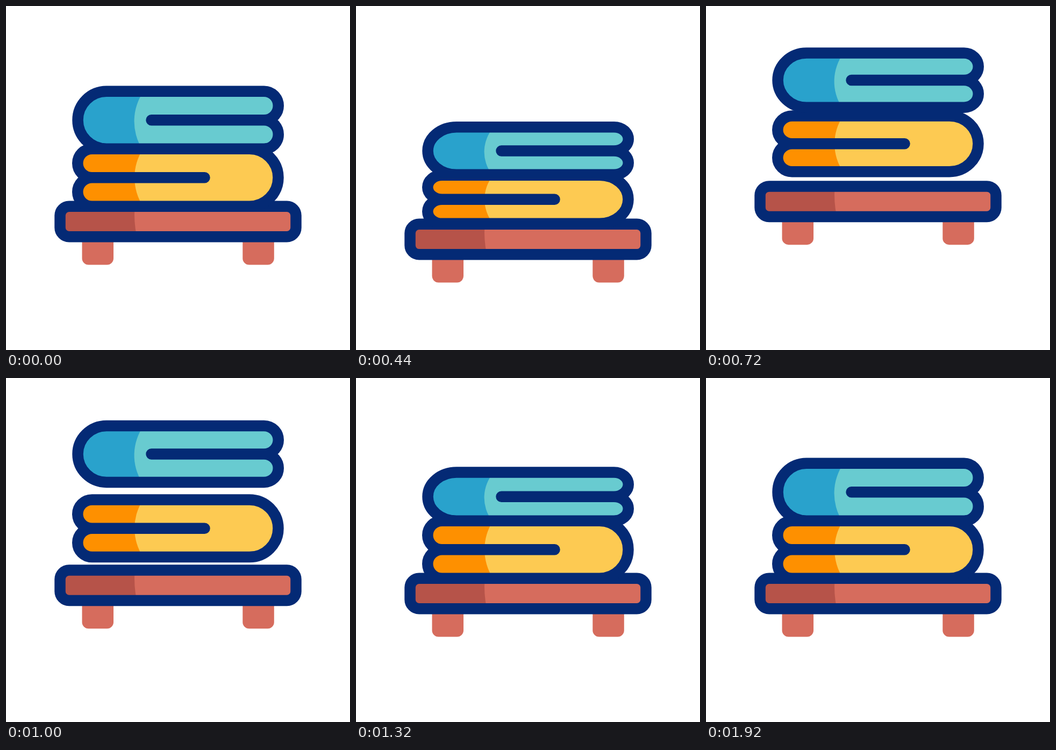
Write an HTML page that moves like this. It is 640 px wide and 640 px high and loops after 2200 ms.

```html
<!DOCTYPE html>
<html lang="en">
<head>
<meta charset="utf-8">
<title>Towels on a shelf</title>
<style>
  html, body { margin: 0; width: 100%; height: 100%; overflow: hidden; background: #fff; }
  svg { display: block; width: 100%; height: 100%; }

  .outline {
    stroke: #042a75; stroke-width: 20.5;
    stroke-linecap: round; stroke-linejoin: round;
    vector-effect: non-scaling-stroke;
  }

  .shelf, .lower, .upper {
    animation: 2200ms cubic-bezier(.333, 0, .667, 1) infinite;
  }
  .shelf { animation-name: shelf-move; }
  .lower { animation-name: lower-move, lower-squash; }
  .upper { animation-name: upper-move, upper-squash; }

  @keyframes shelf-move {
    0% { translate: 0 0; animation-timing-function: cubic-bezier(.33, 0, .58, 1); }
    17.27% { translate: 0 39px; }
    33.64% { translate: 0 -38px; }
    54.55%, 100% { translate: 0 0; }
  }

  @keyframes lower-move {
    0% { translate: 0 0; animation-timing-function: cubic-bezier(.33, 0, .58, 1); }
    17.27% { translate: 0 39px; }
    35.45% { translate: 0 -71px; }
    57.27%, 100% { translate: 0 0; }
  }
  @keyframes lower-squash {
    0%, 4.55% { scale: 1 1; }
    19.09% { scale: 1 .841; }
    36.36% { scale: 1 .986; }
    50%, 100% { scale: 1 1; }
  }

  @keyframes upper-move {
    0% { translate: 0 0; animation-timing-function: cubic-bezier(.45, 0, .67, 1); }
    17.73% { translate: 0 53.5px; animation-timing-function: cubic-bezier(.33, 0, .55, 1); }
    39.09% { translate: 0 -100.5px; }
    57.27%, 100% { translate: 0 0; }
  }
  @keyframes upper-squash {
    0%, 7.27% { scale: 1 1; }
    20% { scale: 1 .827; }
    38.18% { scale: 1 .977; }
    54.55% { scale: 1 .986; }
    61.82% { scale: 1 .818; }
    72.73% { scale: 1 1.075; }
    87.27%, 100% { scale: 1 1; }
  }
</style>
</head>
<body>
<svg viewBox="0 0 640 640">
  <defs>
    <!-- folded towel standing on y = 0 -->
    <path id="towel" d="M480-53.5a26.75 26.75 0 0 0 0-53.5H187a53.5 53.5 0 0 0 0 107H480a26.75 26.75 0 0 0 0-53.5H270.5"/>
  </defs>

  <g class="shelf">
    <g fill="#d66c5d">
      <rect x="141.5" y="415" width="58.5" height="66.5" rx="12"/>
      <rect x="440.3" y="415" width="58.5" height="66.5" rx="12"/>
      <rect x="100.5" y="372.75" width="439" height="56.5" rx="17"/>
    </g>
    <path fill="#b65349" d="M105 375H239.5Q237.5 400 243 428H105z"/>
    <rect class="outline" fill="none" x="100.5" y="372.75" width="439" height="56.5" rx="17"/>
  </g>

  <g transform="translate(0 372.75)">
    <g class="lower">
      <use href="#towel" fill="#fdca52" transform="matrix(-1 0 0 1 640 0)"/>
      <path fill="#fe9000" d="M255-107H160a26.75 26.75 0 0 0 0 53.5a26.75 26.75 0 0 0 0 53.5H255A98 98 0 0 1 255-107z"/>
      <path class="outline" fill="none" transform="matrix(-1 0 0 1 640 0)" d="M480-53.5a26.75 26.75 0 0 0 0-53.5H187a53.5 53.5 0 0 0 0 107H480a26.75 26.75 0 0 0 0-53.5H270.5"/>
    </g>
  </g>

  <g transform="translate(0 265.75)">
    <g class="upper">
      <use href="#towel" fill="#68cbd0"/>
      <path fill="#29a2cc" d="M187 0H253A98 98 0 0 1 256-107H187a53.5 53.5 0 0 0 0 107z"/>
      <path class="outline" fill="none" d="M480-53.5a26.75 26.75 0 0 0 0-53.5H187a53.5 53.5 0 0 0 0 107H480a26.75 26.75 0 0 0 0-53.5H270.5"/>
    </g>
  </g>
</svg>
</body>
</html>
```
